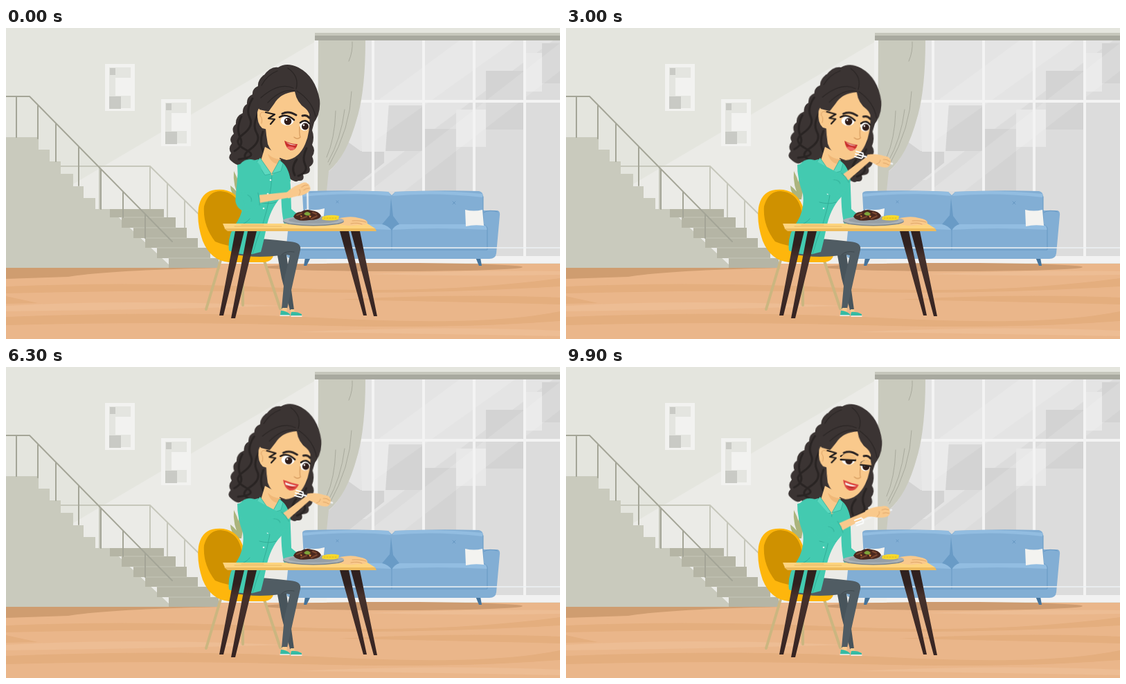
An HTML page without scripts for the animation above (10 s loop, 800x450 px).

```html
<!DOCTYPE html>
<html lang="en">
<head>
<meta charset="utf-8">
<title>Dinner at home</title>
<style>
html, body { margin: 0; width: 100%; height: 100%; overflow: hidden; background: #e4e5de; }
svg { display: block; width: 100vw; height: 100vh; }
.line { fill: none; stroke-linecap: round; stroke-linejoin: round; }
.teal { fill: #43cab0; }
.skin { fill: #f9c98c; }
.hair { fill: #3b3433; }
.upper, .fore, .hand, .fork, .head, .wide, .calm, .bite, .lids { animation: 10s linear infinite; }
.upper { animation-name: upper; }
.fore { animation-name: fore; }
.hand { animation-name: hand; }
.fork { animation-name: fork; }
.head { animation-name: nod; transform-origin: 396px 165px; }
.wide { animation-name: wide; animation-timing-function: step-end; }
.calm { animation-name: calm; animation-timing-function: step-end; }
.bite { animation-name: bite; animation-timing-function: step-end; }
.lids { animation-name: blink; animation-timing-function: step-end; }
/* each joint turns relative to its parent: rest, cut, lift, near, mouth */
@keyframes upper {
  0%, 15%, 38%, 55%, 78%, 95% { transform: rotate(95deg); }
  8%, 48%, 88% { transform: rotate(94deg); }
  18%, 58%, 98% { transform: rotate(58deg); }
  19%, 59%, 99%, 100% { transform: rotate(48deg); }
  22%, 31%, 62%, 71% { transform: rotate(28deg); }
}
@keyframes fore {
  0%, 4%, 12%, 15%, 38%, 44%, 52%, 55%, 78%, 84%, 92%, 95% { transform: rotate(-103deg); }
  8%, 48%, 88% { transform: rotate(-106deg); }
  18%, 58%, 98% { transform: rotate(-75deg); }
  19%, 59%, 99%, 100% { transform: rotate(-74deg); }
  22%, 31%, 62%, 71% { transform: rotate(-67deg); }
}
@keyframes hand {
  0%, 15%, 38%, 55%, 78%, 95% { transform: rotate(-16deg); }
  18%, 58%, 98% { transform: rotate(-1deg); }
  19%, 59%, 99%, 100% { transform: rotate(20deg); }
  22%, 31%, 62%, 71% { transform: rotate(53deg); }
}
@keyframes fork {
  0%, 15%, 38%, 55%, 78%, 95% { transform: rotate(113deg); }
  8%, 48%, 88% { transform: rotate(117deg); }
  18%, 58%, 98% { transform: rotate(156deg); }
  19%, 59%, 99%, 100% { transform: rotate(166deg); }
  22%, 31%, 62%, 71% { transform: rotate(181deg); }
}
@keyframes nod {
  0%, 15%, 38%, 55%, 78%, 95% { transform: rotate(0deg); }
  18%, 22%, 31%, 58%, 62%, 71%, 98% { transform: rotate(2.2deg); }
  19%, 59%, 99%, 100% { transform: rotate(3.2deg); }
}
@keyframes wide { 0%, 24%, 64% { opacity: 0; } 16%, 56%, 96%, 100% { opacity: 1; } }
@keyframes calm { 0%, 24%, 64% { opacity: 1; } 16%, 56%, 96%, 100% { opacity: 0; } }
@keyframes bite { 0%, 20%, 60%, 98.8%, 100% { opacity: 0; } 15%, 55%, 95% { opacity: 1; } }
@keyframes blink { 0%, 97% { opacity: 0; } 98.5%, 100% { opacity: 1; } }
</style>
</head>
<body>
<svg viewBox="0 0 800 450">
  <defs>
    <linearGradient id="leg" x2="0" y2="1">
      <stop offset=".16" stop-color="#30211f"/><stop offset=".3" stop-color="#46312c"/><stop offset="1" stop-color="#352422"/>
    </linearGradient>
    <clipPath id="pane"><path d="M463 18H800V340H463Z"/></clipPath>
  </defs>

  <!-- wall -->
  <path fill="#e4e5de" d="M0 0H800V350H0Z"/>
  <path fill="#ebebe7" d="M446 20L95 227V347H446Z"/>

  <!-- window -->
  <g clip-path="url(#pane)">
    <path fill="#dcdcdc" d="M463 18H800V340H463Z"/>
    <path fill="#e4e4e4" d="M463 18H790L520 220H463Z"/>
    <path fill="#d3d3d3" d="M693 62H748V147H693ZM774 22H800V80H774ZM605 146H650V236H605ZM552 112H603V178H546ZM463 236V210Q482 196 494 165L512 178H546V195L495 236Z"/>
    <path fill="#e8e8e8" d="M512 107H553L548 179H514ZM650 118H693V172H650ZM750 36H774V92H750Z"/>
    <path fill="#fff" opacity=".14" d="M655 18H735L530 165V110ZM800 22V62L575 236H525Z"/>
    <path class="line" stroke="#f3f3f3" stroke-width="4" d="M530 18V340M603 18V340M676 18V340M749 18V340M463 106H800"/>
    <path fill="#f2f2f2" d="M463 330H800V340H463Z"/>
  </g>
  <path fill="#f0f0ee" d="M445 18H452V340H445ZM235 333H463V341H235Z"/>
  <path fill="#c9cabd" d="M451 18H519Q519 90 507 130Q492 186 466 207L463 236H450Z"/>
  <path class="line" stroke="#a9aa9d" d="M500 20Q501 34 495 48M499 92Q497 145 467 198M489 118Q484 160 465 194M476 120Q475 160 463 187"/>
  <path fill="#a8a99f" d="M446 8H800V18H446Z"/>
  <path fill="#c5c6bb" d="M446 7H800V11H446Z"/>

  <!-- pictures -->
  <g id="art">
    <path fill="#f2f2f0" d="M143 52H186V120H143Z"/>
    <path fill="#e4e5e0" d="M149 57H180V116H149Z"/>
    <path fill="#c9cac5" d="M150 58H158V68H150ZM149 99H166V117H149Z"/>
    <path fill="#f2f2f0" d="M158 72H180V98H158Z"/>
  </g>
  <use href="#art" x="81" y="51"/>

  <!-- floor -->
  <path fill="#eab68a" d="M0 347H235V341H800V450H0Z"/>
  <path fill="#e4ae7e" d="M0 374Q180 366 400 376T800 362V374Q600 386 420 382T0 384ZM0 418Q250 408 470 420T800 410V424Q640 436 430 430T0 430ZM480 393Q650 384 800 390V400Q640 396 480 393ZM0 388L46 398L0 399Z"/>
  <path fill="#edbd94" d="M0 402Q180 392 400 402Q200 408 0 410ZM420 440Q620 430 800 438V446Q600 442 420 440ZM520 356Q660 350 800 352V357Q660 360 520 356Z"/>
  <path fill="#cf9d70" d="M0 347H320Q150 350 90 360L0 363Z"/>
  <ellipse cx="560" cy="346" rx="186" ry="6" fill="#cd9b70"/>

  <!-- stairs -->
  <path class="line" stroke="#c6c7bb" stroke-width="2" d="M78 200H208L290 281M135 200V262M208 200V262M233 226V330M258 250V300"/>
  <path fill="#c9cabd" d="M0 158H47V176H63V193H79V211H97V229H112V246H129V262H150L240 347H0Z"/>
  <path fill="#b5b5a5" d="M150 262H228V274H245V289H261V304H277V318H295V333H307V347H235V333H218V318H201V304H184V289H167V274H150Z"/>
  <path class="line" stroke="#c5c6b8" d="M167 274H228M184 289H245M201 304H261M218 318H277M235 333H295"/>
  <path class="line" stroke="#a4a597" stroke-width="2" d="M0 99H34L240 309M15 99V158M46 112V160M72 138V193M105 172V228M137 204V262M169 237V274M201 270V304"/>

  <!-- sofa -->
  <path fill="#45749c" d="M432 332H440L434 344H430ZM678 332H685L687 344H683Z"/>
  <path fill="#82aed4" d="M428 240Q428 236 436 236Q500 234 552 237L557 242L562 237Q620 234 683 236Q689 237 689 244V264H708Q714 264 713 271L708 326Q707 334 698 334H414Q404 334 404 324L408 284L430 276Z"/>
  <path fill="#92bde1" d="M429 240Q490 234 552 237L556 243Q500 237 429 244ZM562 237Q630 234 688 240V245Q620 237 558 243ZM428 284H550Q556 284 556 292Q490 289 418 292ZM562 284H690Q695 285 695 292Q620 288 558 292Z"/>
  <path fill="#699bc6" d="M556 246L559 272L568 284Q561 286 557 293Q552 286 543 284L554 271Z"/>
  <path class="line" stroke="#6798c3" d="M689 244V284Q696 286 695 294V321H418M557 292V321M477 250l3 3m0-3l-3 3M645 251l4 4m0-4l-4 4M690 267Q698 262 710 266"/>
  <path fill="#f3f3f0" d="M663 263Q676 266 688 263L690 286Q676 284 664 287ZM432 262Q446 265 460 261L458 280H434Z"/>
  <path stroke="#eef2f5" stroke-width="1.3" d="M370 318H800"/>

  <!-- plant and chair -->
  <path fill="#abb47c" d="M338 248Q327 228 329 207Q339 225 340 248ZM337 248Q332 222 341 203Q345 225 340 248ZM335 248Q324 240 324 228Q335 236 339 248Z"/>
  <path class="line" stroke="#cbb680" stroke-width="4" d="M310 336L289 407M342 336V401M372 334L396 406"/>
  <path fill="#feb60c" d="M303 234Q334 231 343 262L352 316H384Q392 337 372 339H322Q296 337 284 308Q275 282 278 260Q282 236 303 234Z"/>
  <path fill="#cf9100" d="M310 236Q334 238 340 264L350 316Q322 318 302 309Q284 286 286 258Q292 236 310 236Z"/>

  <!-- hair behind -->
  <g class="head">
    <path class="hair" d="M372 68Q363 76 364 84Q355 88 356 96Q347 100 348 110Q341 114 342 123Q331 128 332 139Q325 144 329 153Q321 160 326 167Q320 174 325 181Q319 188 326 193Q336 202 342 196Q348 205 358 198L396 214Q406 211 411 219Q419 224 422 221Q432 222 429 212Q442 211 438 201Q447 196 442 186Q448 177 442 169Q446 158 442 148L448 125L425 100Z"/>
    <path class="line" stroke="#292423" stroke-width="3" d="M356 102Q346 118 352 130T342 154T346 176T336 190M365 122Q355 140 362 152T352 176T358 194M371 150Q365 166 372 180M340 128Q332 146 338 158T330 178M434 174Q427 188 432 198T422 214M420 190Q411 202 417 213"/>
  </g>

  <!-- legs -->
  <path fill="#48545b" d="M390 318L404 320L408 350L416 408H410L398 362Z"/>
  <path fill="#505c63" d="M323 306Q350 302 410 309Q427 310 425 321L406 406H398L402 362L410 329Q400 326 396 329Q360 334 327 327Z"/>
  <path class="line" stroke="#3f4a50" d="M398 328Q404 322 416 324"/>
  <path class="skin" d="M399 405H406L405 411H399ZM411 407H416L417 412H411Z"/>
  <path fill="#35bba4" d="M397 409Q404 409 410 414V416H396ZM412 411Q420 410 427 414V416H411Z"/>
  <path class="line" stroke="#f3f6f3" stroke-width="1.3" d="M396 416H409M412 417H427"/>

  <!-- body -->
  <path class="teal" d="M397 199Q411 206 411 233L412 262L429 276L424 285H402Q396 262 398 225Z"/>
  <path class="teal" d="M334 198L364 190L396 192Q408 200 411 221L402 240Q384 256 377 284Q372 310 368 324Q345 332 322 322Q319 300 334 280Q345 262 342 240Q334 218 334 198Z"/>
  <path class="skin" d="M374 172L396 184L394 197L384 214L368 192Z"/>
  <path fill="#f0b878" d="M378 182Q386 190 397 190L394 197Q382 196 378 182Z"/>
  <path fill="#5cd8bf" stroke="#31ae97" stroke-width=".8" d="M367 188L383 211L374 213L362 194ZM395 191L384 211L397 207L400 196Z"/>
  <path class="line" stroke="#31ae97" d="M384 212Q383 245 371 283Q362 306 356 327M390 252Q380 256 366 252M352 276Q346 284 336 285"/>
  <g fill="#e2f5ef"><circle cx="382" cy="220" r="1.3"/><circle cx="378" cy="240" r="1.3"/><circle cx="372" cy="261" r="1.3"/></g>

  <!-- head -->
  <g class="head">
    <path class="hair" d="M364 92H390V122H366Z"/>
    <path class="skin" d="M381 118Q392 94 417 91Q434 106 438 124Q440 150 432 168Q423 189 405 191Q386 187 378 168Q373 140 375 122Z"/>
    <path class="skin" d="M378 121Q365 110 363 122Q362 138 370 145L378 147Z"/>
    <path class="line" stroke="#dea567" d="M375 123Q367 119 367 127Q371 131 369 138"/>
    <path class="hair" d="M366 118Q357 92 372 69Q382 55 393 57Q405 49 422 57Q447 70 453 104Q455 125 443 139Q438 120 432 116Q420 108 417 92Q396 94 387 110L379 121Z"/>
    <path class="line" stroke="#2b2625" stroke-width="1.3" d="M417 91Q398 87 378 108M415 87Q394 78 368 101M419 88Q424 70 407 58M420 91Q442 105 447 128M392 62Q377 68 369 83"/>
    <path class="line" stroke="#1e1a1a" stroke-width="2.2" d="M375 122L388 125L379 131L388 132L382 139"/>
    <path class="line" stroke="#2c2524" stroke-width="3" d="M399 124Q408 119 419 126M428 127Q434 125 438 130"/>
    <ellipse cx="406" cy="134" rx="9.5" ry="7" fill="#fff"/>
    <ellipse cx="431" cy="141.5" rx="7" ry="7" fill="#fff"/>
    <circle cx="407" cy="135" r="5.3" fill="#2f1c18"/>
    <circle cx="432" cy="142.5" r="5" fill="#2f1c18"/>
    <g fill="#fff"><circle cx="405" cy="133" r="1.2"/><circle cx="430" cy="140.5" r="1.2"/></g>
    <path class="line" stroke="#221c1b" stroke-width="2.6" d="M395 129Q405 123 416 133M425 137Q432 131 438 138"/>
    <g class="lids">
      <path fill="#f3c081" d="M394 134Q397 122 410 125Q417 128 417 134ZM423 140Q427 130 438 134Q440 138 440 142Z"/>
      <path class="line" stroke="#221c1b" stroke-width="2.4" d="M395 134L416 134M424 140L439 141"/>
    </g>
    <path class="line" stroke="#d99f62" stroke-width="1.4" d="M424 143Q423 152 425 158Q421 162 416 158"/>
    <g class="calm">
      <path fill="#c92f2c" d="M402 163Q411 168 421 168Q419 177 411 177Q404 174 402 163Z"/>
      <path fill="#f6f1ea" d="M404 165Q412 169 419 169Q412 171 404 165Z"/>
      <path fill="#ed6a62" d="M405 172Q412 170 418 174Q412 180 405 172Z"/>
    </g>
    <g class="wide">
      <path fill="#dc4540" d="M400 163Q411 167 423 169Q419 179 410 178Q402 175 400 163Z"/>
      <path fill="#f6f1ea" d="M403 166.5Q412 170 420 171Q413 173 404 170Z"/>
      <path fill="#a82a28" d="M405 171Q413 174 418 173Q412 177 405 171Z"/>
    </g>
  </g>

  <!-- eating arm -->
  <g transform="translate(352 207)"><g class="upper">
    <g transform="translate(43 0)"><g class="fore">
      <path class="skin" d="M10 -6L62 -4Q67 0 62 4L10 6Z"/>
      <g transform="translate(62 0)"><g class="hand">
        <g transform="translate(28 0)"><g class="fork">
          <path class="line" stroke="#eef1f3" stroke-width="2.4" d="M-6 0H37"/>
          <path class="line" stroke="#fafbfb" stroke-width="2" d="M49 -4H39Q36 0 39 4H49M38 0H49"/>
          <path class="bite" fill="#4a2418" d="M47 -4Q54 -6 58 0Q56 6 49 4Z"/>
        </g></g>
        <path class="skin" d="M-4 -4Q8 -9 20 -8Q29 -9 31 -3Q33 4 28 7Q19 10 8 6L-4 4Z"/>
        <path class="line" stroke="#dfa568" d="M20 -3Q25 -5 30 -2M21 2Q26 1 30 3M12 6Q17 3 16 -1"/>
      </g></g>
    </g></g>
    <path class="line" stroke="#43cab0" stroke-width="34" d="M0 0H42"/>
    <g transform="translate(43 0)"><g class="fore">
      <path class="teal" d="M-8 -14L17 -9Q19 0 17 9L-3 14Z"/>
      <path class="line" stroke="#31ae97" d="M17 -9Q19 0 17 9M2 -8Q8 -4 6 2"/>
    </g></g>
  </g></g>

  <!-- table -->
  <path fill="url(#leg)" d="M331 294H344L314 416H308ZM349 294H362L331 420H325ZM482 294H495L521 416H516ZM498 294H511L536 417H531Z"/>
  <path fill="#fdd47f" d="M313 283H522L533 290H316Z"/>
  <path fill="#edbb5d" d="M315 290H533L535 294H320Z"/>
  <path class="line" stroke="#e7b967" d="M330 287H398M340 285H372"/>
  <path class="skin" d="M478 276Q498 271 510 275Q522 277 522 282Q520 286 508 285Q494 288 478 283Z"/>
  <path class="line" stroke="#dfa568" d="M500 279Q512 278 520 281M498 283Q508 281 514 284"/>

  <!-- meal -->
  <ellipse cx="444" cy="280" rx="44" ry="6.5" fill="#7b858b"/>
  <ellipse cx="444" cy="278.5" rx="44" ry="6.5" fill="#a9b1b6"/>
  <ellipse cx="444" cy="278" rx="36" ry="4.8" fill="#979fa5"/>
  <g transform="translate(0 -2)">
    <path fill="#4a281e" d="M415 275Q418 268 426 268Q433 263 441 266Q452 267 455 274Q452 280 438 280Q420 283 415 275Z"/>
    <path class="line" stroke="#7d4830" stroke-width="2" d="M420 273L427 270M426 278L434 275M441 278L449 274M443 269L448 271"/>
    <path fill="#7fa43b" d="M430 271Q435 265 440 271Q436 276 430 271Z"/>
    <path fill="#dd8a3d" d="M437 273l4 1-2 3zM425 273l3 1-2 2z"/>
    <path fill="#f7d92c" d="M457 275Q468 271 481 274L480 279Q468 282 456 279Z"/>
    <path class="line" stroke="#dcb51d" stroke-dasharray="2 2" d="M459 277H479"/>
  </g>
</svg>
</body>
</html>
```
